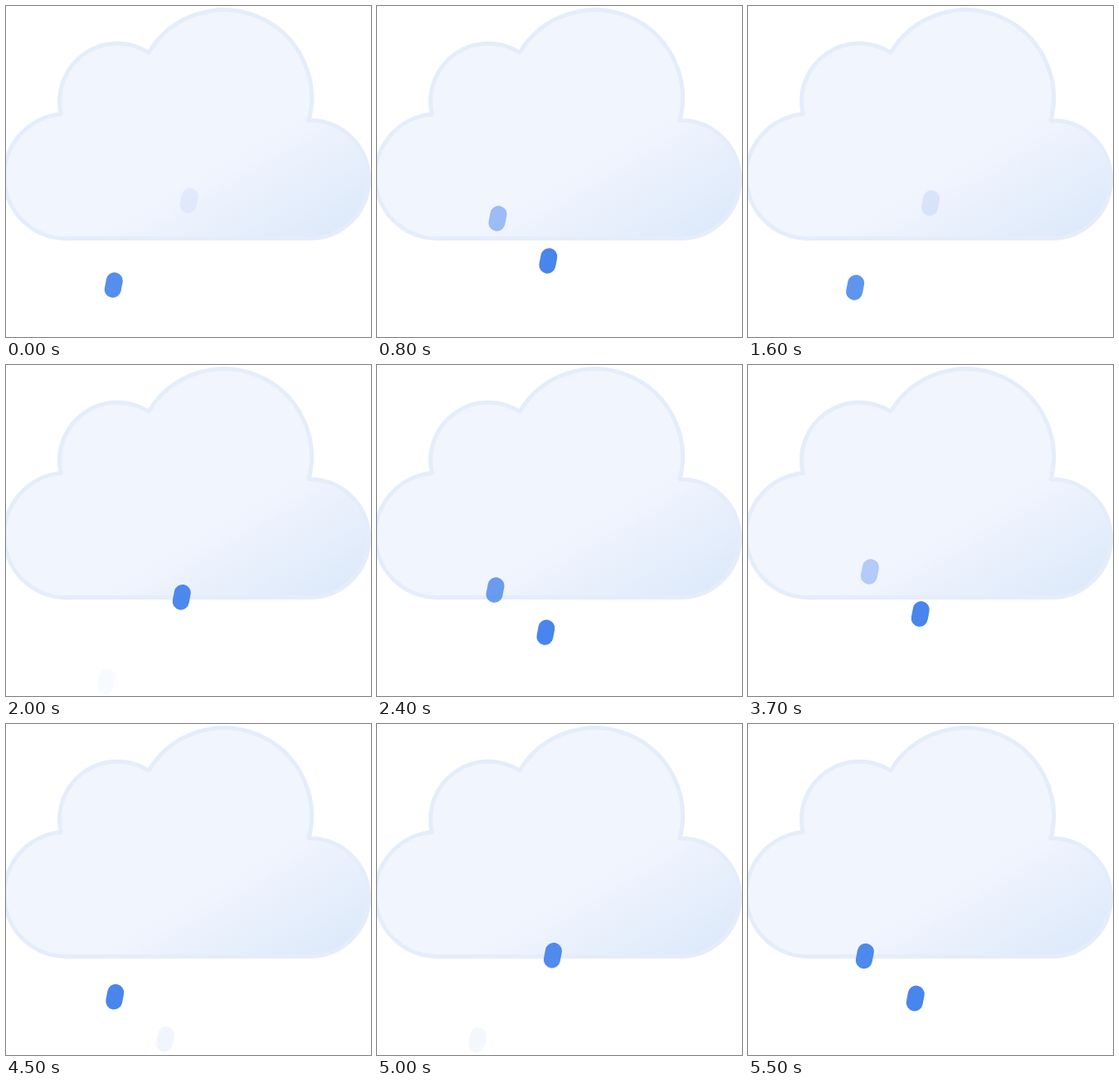
Write an HTML page without scripts that moves like this. It is 440 px wide and 398 px high and loops after 5600 ms.

```html
<!DOCTYPE html>
<html lang="en">
<head>
<meta charset="utf-8">
<title>Rain cloud</title>
<style>
  /* --p counts falls; each drop is visible while --p minus its --k is between 0 and 1 */
  @property --p {
    syntax: "<number>";
    inherits: true;
    initial-value: 0.692;
  }
  html, body {
    margin: 0;
    width: 100%;
    height: 100%;
    overflow: hidden;
    background: #fff;
  }
  svg {
    display: block;
    width: 440px;
    height: 398px;
  }
  .rain {
    animation: rain 5600ms infinite;
  }
  .drop {
    --q: calc(var(--p) - var(--k));
    opacity: min(1, 3 * var(--q), 3 - 3 * var(--q));
    transform: translate(calc(var(--q) * -30px), calc(var(--q) * 152.5px));
    stroke: #4885ec;
    stroke-width: 20;
    stroke-linecap: round;
  }
  @keyframes rain {
    0% { --p: 0.692; animation-timing-function: steps(8); }
    14.2857% { --p: 1.167; animation-timing-function: steps(8); }
    28.5714% { --p: 1.711; animation-timing-function: steps(8); }
    42.8571% { --p: 2.266; animation-timing-function: steps(13); }
    66.0714% { --p: 3.121; animation-timing-function: steps(8); }
    80.3571% { --p: 3.643; animation-timing-function: steps(10); }
    98.2143% { --p: 4.321; animation-timing-function: steps(1); }
    100% { --p: 4.388; }
  }
</style>
</head>
<body>
<svg viewBox="0 0 440 398" xmlns="http://www.w3.org/2000/svg">
  <defs>
    <linearGradient id="shade" gradientUnits="userSpaceOnUse" x1="245" y1="195" x2="315" y2="315">
      <stop offset="0" stop-color="#f1f5fe"/>
      <stop offset="1" stop-color="#deeafa"/>
    </linearGradient>
    <path id="bead" d="M1 -5.25 L-1 5.25"/>
  </defs>

  <path fill="url(#shade)" stroke="#e5edfa" stroke-width="5" stroke-linejoin="round"
    d="M79.5 279.5 A75 75 0 0 1 66.3 130 A69.7 69.7 0 0 1 172 56
       A105.8 105.8 0 0 1 365 137.5 A71 71 0 1 1 368 279.5 Z"/>

  <g class="rain">
    <g transform="translate(150.5 230)">
      <use class="drop" href="#bead" style="--k: 0"/>
      <use class="drop" href="#bead" style="--k: 1"/>
      <use class="drop" href="#bead" style="--k: 2"/>
      <use class="drop" href="#bead" style="--k: 3"/>
      <use class="drop" href="#bead" style="--k: 4"/>
    </g>
    <g transform="translate(221.4 230)">
      <use class="drop" href="#bead" style="--k: 0.666"/>
      <use class="drop" href="#bead" style="--k: 1.666"/>
      <use class="drop" href="#bead" style="--k: 2.666"/>
      <use class="drop" href="#bead" style="--k: 3.666"/>
    </g>
  </g>
</svg>
</body>
</html>
```
